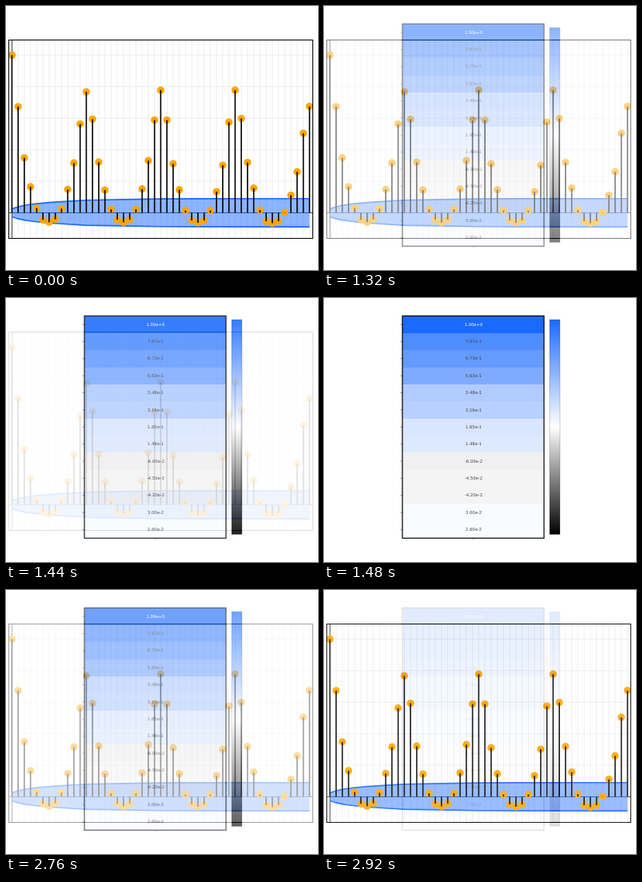
An HTML page with a canvas for the animation above (2.96 s loop, 390x330 px).

```html
<!DOCTYPE html>
<html lang="en">
<head>
<meta charset="utf-8">
<title>Correlogram and heatmap</title>
<style>
  html, body { margin: 0; width: 100%; height: 100%; overflow: hidden; background: #fff; }
  canvas { display: block; width: 390px; height: 330px; }
</style>
</head>
<body>
<canvas id="stage" width="390" height="330"></canvas>
<script>
const W = 390, H = 330, LOOP = 2960, HOLD = 1200, STEP = 40, STEPS = 8;
const BLUE = '#1a6aff';

// Autocorrelation per lag, in thousandths
const acf = [
  1000, 673, 348, 165, 30, -45, -60, -42, 26, 148, 316, 563, 767,
  593, 321, 144, 22, -44, -62, -44, 22, 151, 331, 588, 778,
  588, 311, 146, 14, -49, -64, -49, 14, 134, 301, 575, 778,
  598, 319, 156, 17, -54, -67, -54, 2, 111, 260, 504, 674
].map(v => v / 1000);

// Half height of the confidence band: [lag, pixels]
const band = [[0, 5], [1, 7.5], [2, 9.2], [3, 10.4], [4, 11.3], [6, 12.8],
  [8, 13.8], [12, 15.7], [18, 16.5], [24, 17.3], [30, 17.5], [48, 17.7]];

const X0 = 7.4, DX = 7.75, Y0 = 258.4, SCALE = 197;
const lagX = i => X0 + i * DX;
const valueY = v => Y0 - v * SCALE;

function layer(paint) {
  const c = document.createElement('canvas');
  c.width = W;
  c.height = H;
  const g = c.getContext('2d');
  g.fillStyle = '#fff';
  g.fillRect(0, 0, W, H);
  paint(g);
  return c;
}

function line(g, x1, y1, x2, y2, color, width = 1) {
  g.strokeStyle = color;
  g.lineWidth = width;
  g.beginPath();
  g.moveTo(x1, y1);
  g.lineTo(x2, y2);
  g.stroke();
}

function bandEdge(g, sign, points) {
  for (const [lag, h] of points) g.lineTo(lagX(lag), Y0 + sign * h);
}

function paintStems(g) {
  for (let i = 1; i < acf.length; i++) line(g, lagX(i), 43, lagX(i), 290, '#eee');
  for (let k = 1; k <= 5; k++) {
    const y = valueY(k / 5);
    line(g, 3, y, 383, y, '#eee');
  }
  line(g, 7.5, 43, 7.5, 290, '#444');
  line(g, 3, 258.5, 383, 258.5, '#444');

  g.fillStyle = 'rgba(26,106,255,0.5)';
  g.beginPath();
  bandEdge(g, -1, band);
  bandEdge(g, 1, [...band].reverse());
  g.fill();
  g.strokeStyle = BLUE;
  g.lineWidth = 1.6;
  for (const sign of [-1, 1]) {
    g.beginPath();
    bandEdge(g, sign, band);
    g.stroke();
  }

  g.fillStyle = '#ffa500';
  acf.forEach((v, i) => {
    g.beginPath();
    g.arc(lagX(i), valueY(v), 4.6, 0, Math.PI * 2);
    g.fill();
  });
  acf.forEach((v, i) => line(g, lagX(i), Y0, lagX(i), valueY(v), '#000', 1.6));

  g.strokeStyle = '#000';
  g.lineWidth = 1;
  g.strokeRect(3.5, 42.5, 380, 248);
}

// Black at -1, white at 0, blue at 1
function shade(v) {
  const mix = v < 0 ? [0, 0, 0] : [26, 106, 255];
  return `rgb(${mix.map(c => Math.round(255 + (c - 255) * Math.abs(v))).join()})`;
}

function paintHeat(g) {
  const left = 98, right = 275, top = 22.4, bottom = 300.2;
  const rows = acf.slice(0, 13).sort((a, b) => Math.abs(b) - Math.abs(a));
  const rowH = (bottom - top) / rows.length;
  g.font = '5.3px "DejaVu Sans", Verdana, sans-serif';
  g.textAlign = 'center';
  g.textBaseline = 'middle';
  rows.forEach((v, i) => {
    const y = Math.round(top + i * rowH), next = Math.round(top + (i + 1) * rowH);
    const mid = top + (i + 0.5) * rowH;
    g.fillStyle = shade(v);
    g.fillRect(left, y, right - left, next - y);
    g.fillStyle = i ? '#444' : '#fff';
    g.fillText(v.toExponential(2), 187, mid + 0.2);
    line(g, 95.5, mid, left, mid, '#444', 0.6);
  });
  line(g, 186.7, 300, 186.7, 302, '#444', 0.6);
  g.strokeStyle = '#000';
  g.lineWidth = 1.2;
  g.strokeRect(left, top, right - left, bottom - top);

  const bar = g.createLinearGradient(0, 27, 0, 295.5);
  bar.addColorStop(0, shade(1));
  bar.addColorStop(0.5, shade(0));
  bar.addColorStop(1, shade(-1));
  g.fillStyle = bar;
  g.fillRect(282, 27, 13, 268.5);
  g.strokeStyle = 'rgba(68,68,68,0.45)';
  g.lineWidth = 0.6;
  g.strokeRect(282, 27, 13, 268.5);
}

const stems = layer(paintStems);
const heat = layer(paintHeat);
const ctx = document.getElementById('stage').getContext('2d');

// Share of the heatmap in the stepped cross-fade
function heatShare(t) {
  const half = LOOP / 2;
  const local = t % half;
  const done = local < HOLD ? 0 : Math.floor((local - HOLD) / STEP) + 1;
  const share = Math.min(done, STEPS) / STEPS;
  return t < half ? share : 1 - share;
}

function draw(t) {
  ctx.globalAlpha = 1;
  ctx.drawImage(stems, 0, 0);
  ctx.globalAlpha = heatShare(t);
  ctx.drawImage(heat, 0, 0);
}

function tick() {
  draw((performance.now() - start) % LOOP);
  requestAnimationFrame(tick);
}

const start = performance.now();
tick();
</script>
</body>
</html>
```
